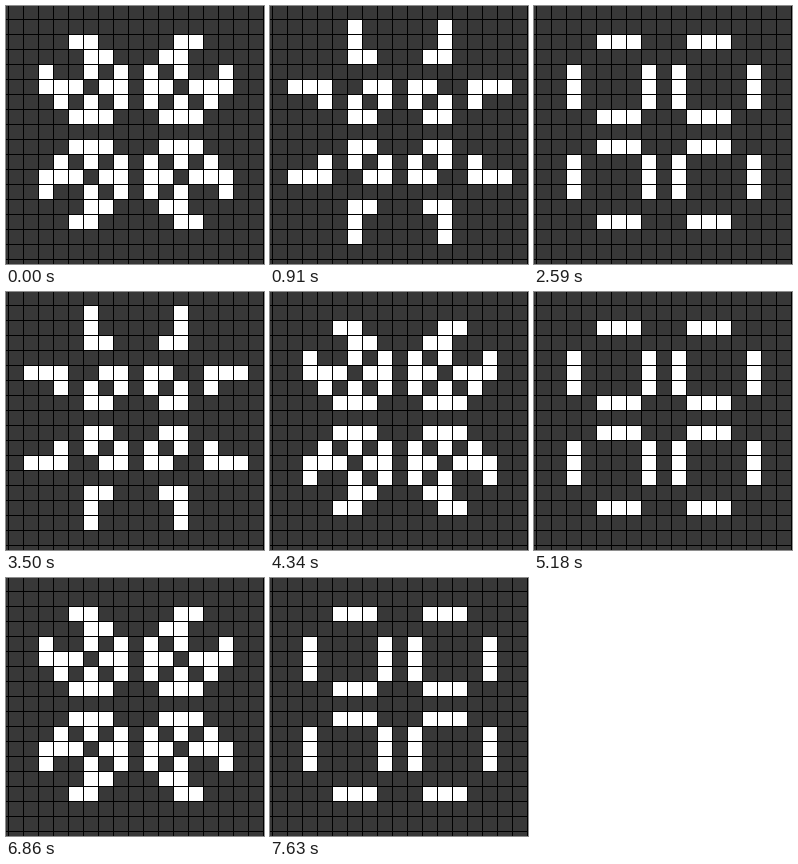
Recreate the animation shown at these times as an HTML page with a canvas. Size 258 by 258 pixels, loop 8 s.

```html
<!DOCTYPE html>
<html lang="en">
<head>
<meta charset="utf-8">
<title>Pulsar</title>
<style>
  html, body { margin: 0; width: 100%; height: 100%; overflow: hidden; background: #000; }
  canvas { display: block; width: 258px; height: 258px; }
</style>
</head>
<body>
<canvas id="stage" width="258" height="258"></canvas>
<script>
const ctx = document.getElementById('stage').getContext('2d');
const SIZE = 18, PITCH = 15, CELL = 14, LEFT = 3, TOP = -1;
const LOOP = 8000;
const DEAD = '#383838', LIVE = '#fff';

// Start time of each step and the generation it shows
const STEPS = [
  [0, 2], [70, 0], [910, 1], [1750, 2], [2590, 0], [3500, 1],
  [4340, 2], [5180, 0], [6020, 1], [6860, 2], [7630, 0]
];

const makeGrid = rule => Array.from({ length: SIZE }, (_, y) =>
  Array.from({ length: SIZE }, (_, x) => rule(x, y)));

const isLine = n => [2, 7, 9, 14].includes(n);
const isBar = n => [4, 5, 6, 10, 11, 12].includes(n);

function nextGeneration(grid) {
  return makeGrid((x, y) => {
    let around = 0;
    for (let dy = -1; dy <= 1; dy++)
      for (let dx = -1; dx <= 1; dx++)
        if ((dx || dy) && grid[y + dy]?.[x + dx]) around++;
    return around === 3 || (around === 2 && grid[y][x]);
  });
}

const first = makeGrid((x, y) => (isLine(x) && isBar(y)) || (isLine(y) && isBar(x)));
const second = nextGeneration(first);
const generations = [first, second, nextGeneration(second)];

function draw(grid) {
  ctx.fillStyle = '#000';
  ctx.fillRect(0, 0, 258, 258);
  for (let y = 0; y < SIZE; y++)
    for (let x = -1; x < SIZE; x++) {
      ctx.fillStyle = grid[y][x] ? LIVE : DEAD;
      ctx.fillRect(LEFT + x * PITCH, TOP + y * PITCH, CELL, CELL);
    }
}

let shown = -1;
function tick() {
  const time = performance.now() % LOOP;
  const generation = STEPS.filter(([start]) => start <= time).pop()[1];
  if (generation !== shown) draw(generations[shown = generation]);
  requestAnimationFrame(tick);
}
tick();
</script>
</body>
</html>
```
